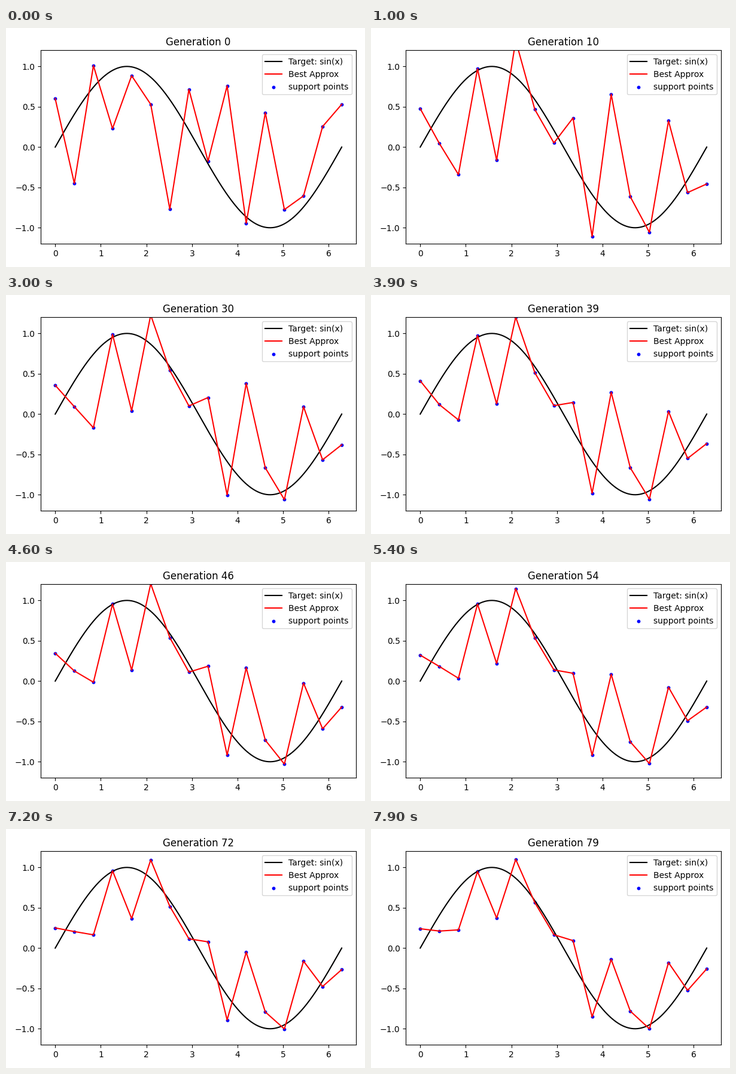
These frames come from a looping animation (600 px wide and 400 px high, 8000 ms). A matplotlib script:

```python
import numpy as np
import matplotlib.pyplot as plt
from matplotlib.animation import FuncAnimation

GENERATIONS = 80
SETTLED = 54      # generation at which the error profile is given
DECAY = 100       # generations for the error to shrink by a factor e
TAKEOVER = 9      # all starting genes are replaced before this generation
MUTATION = 0.02

# Key points: random starting genome and error left after settling
START = [0.60, -0.45, 1.01, 0.23, 0.885, 0.53, -0.77, 0.715,
         -0.175, 0.76, -0.945, 0.425, -0.775, -0.605, 0.255, 0.53]
ERROR = [0.315, -0.23, -0.71, 0.015, -0.77, 0.29, -0.04, -0.095,
         0.345, -0.335, 0.985, 0.255, -0.085, 0.675, -0.11, -0.30]


def evolve(xs):
    """Best genome per generation: crossover jumps, then slow convergence."""
    rng = np.random.default_rng(4)
    gens = np.arange(GENERATIONS)[:, None]
    genomes = np.sin(xs) + ERROR * np.exp((SETTLED - gens) / DECAY)
    genomes += rng.normal(0, MUTATION, genomes.shape)
    switch = rng.integers(1, TAKEOVER, xs.size)
    return np.where(gens < switch, START, genomes)


xs = np.linspace(0, 2 * np.pi, len(START))
x = np.linspace(0, 2 * np.pi, 400)
genomes = evolve(xs)

fig, ax = plt.subplots(figsize=(6, 4), dpi=100)
ax.plot(x, np.sin(x), color="black", label="Target: sin(x)")
line, = ax.plot(xs, genomes[0], color="red", label="Best Approx")
dots = ax.scatter(xs, genomes[0], s=10, color="blue", label="support points")
ax.set_xlim(-0.1 * np.pi, 2.1 * np.pi)
ax.set_ylim(-1.2, 1.2)
title = ax.set_title("Generation 0")
ax.legend(loc="upper right")
fig.tight_layout()


def update(gen):
    line.set_ydata(genomes[gen])
    dots.set_offsets(np.column_stack([xs, genomes[gen]]))
    title.set_text(f"Generation {gen}")
    return line, dots, title


anim = FuncAnimation(fig, update, frames=GENERATIONS, interval=100,
                     repeat=True, repeat_delay=0)
plt.show()
```
